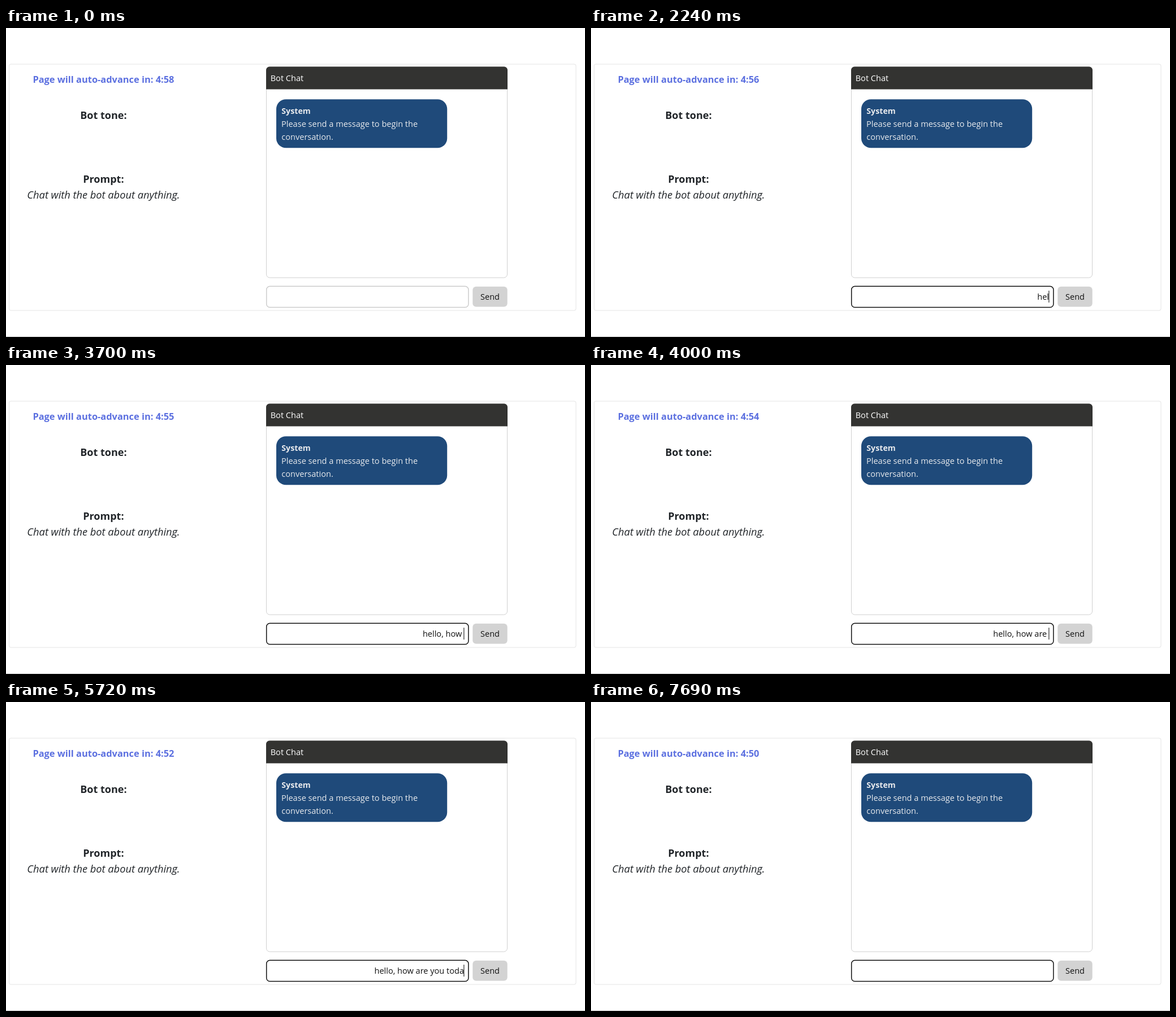
These frames come from a looping animation (1024x547 px, 8000 ms). An HTML page:

```html
<!DOCTYPE html>
<html lang="en">
<head>
<meta charset="utf-8">
<title>Bot Chat</title>
<style>
  html, body { margin: 0; width: 100%; height: 100%; overflow: hidden; background: #fff; }
  svg { display: block; width: 1024px; height: 547px; }
  text { font: 14.55px "Open Sans", "Noto Sans", sans-serif; fill: #111; white-space: pre; }
  .mid { text-anchor: middle; }
  .end { text-anchor: end; }
  .side { font-size: 18px; fill: #212529; }
  .bold { font-weight: 700; }
  #timer { font-size: 16.4px; fill: #5c70e0; }
  .bubble text { fill: #e9ebee; }
</style>
</head>
<body>
<svg viewBox="0 0 1024 547">
  <rect x="5.5" y="64" width="1002.5" height="436" rx="3" fill="#fff" stroke="#e4e4e4"/>
  <path d="M0 546.5H1024" stroke="#c4c4c4"/>

  <text id="timer" class="mid bold" x="172.4" y="97"></text>
  <text class="side mid bold" x="172.4" y="161">Bot tone:</text>
  <text class="side mid bold" x="172.4" y="274">Prompt:</text>
  <text class="side mid" x="172.4" y="302" style="font-size:18.3px;font-style:italic">Chat with the bot about anything.</text>

  <rect x="460.5" y="68.5" width="426" height="373.5" rx="6" fill="#fff" stroke="#d0d0d0"/>
  <path d="M460 108.5V74.5a6 6 0 0 1 6-6H881a6 6 0 0 1 6 6V108.5Z" fill="#333331"/>
  <text x="467.7" y="94" style="fill:#fff">Bot Chat</text>

  <g class="bubble">
    <rect x="478" y="126.3" width="302.2" height="86" rx="17" fill="#1f4a7a"/>
    <text class="bold" x="487.3" y="152" style="font-size:14.2px">System</text>
    <text x="487" y="175">Please send a message to begin the</text>
    <text x="487.3" y="198">conversation.</text>
  </g>

  <rect id="field" x="460.7" y="457.2" width="357.2" height="37.4" rx="6" fill="#fff" stroke-width="1.5"/>
  <text id="typed" class="end" x="810" y="481.3"></text>
  <path id="caret" d="M809.9 465V486" stroke="#000"/>
  <rect x="825.3" y="457.8" width="61.4" height="35.8" rx="6" fill="#d3d3d3"/>
  <text class="mid" x="856" y="481.3">Send</text>

  <g id="mouse">
    <circle r="10.3" fill="#fbf668"/>
    <path id="beam" d="M-1.5 -5.5H0.5M2.5 -5.5H4.5M1.5 -5V5M-1.5 5.5H0.5M2.5 5.5H4.5" stroke="#444" fill="none"/>
    <path id="arrow" d="M0 0V12L3 9.5L5 14L7 13L5 8.8H8.5Z" fill="#fff" stroke="#222" stroke-width=".8"/>
  </g>
</svg>
<script>
const LOOP = 8000, CLICK = 980, SENT = 6530;
const message = "hello, how are you today?";
// moment at which each character of the message appears
const keys = [1870, 2040, 2240, 2370, 2540, 2970, 3120, 3320, 3490, 3540, 3700, 3750, 3830,
  3920, 4000, 4230, 4230, 4260, 4790, 5300, 5380, 5470, 5560, 5820, 5990];
const ticks = [690, 1740, 2740, 3750, 4720, 5720, 6690, 7690];
const caretFlips = [CLICK, 1510, 1870, SENT, 7020, 7560];

const $ = id => document.getElementById(id);
const passed = (list, t) => list.filter(x => x <= t).length;
const show = (id, on) => $(id).setAttribute("visibility", on ? "visible" : "hidden");
const mix = (a, b, k) => a + (b - a) * k;
const progress = (t, from, to) => Math.min(1, Math.max(0, (t - from) / (to - from)));

function moveMouse(t) {
  const visible = t >= 400 && t < 1270;
  const enter = 1 - (1 - progress(t, 400, 780)) ** 2;
  const leave = progress(t, 1080, 1260) ** 1.5;
  const x = mix(mix(996, 781.3, enter), 998, leave);
  const y = mix(mix(499, 470.8, enter), 482, leave);
  const inField = x < 818 && y < 495;
  $("mouse").setAttribute("transform", `translate(${x} ${y})`);
  show("mouse", visible);
  show("beam", visible && inField);
  show("arrow", visible && !inField);
}

function draw(t) {
  $("timer").textContent = "Page will auto-advance in: 4:" + (58 - passed(ticks, t));
  $("typed").textContent = t < SENT ? message.slice(0, passed(keys, t)) : "";
  $("field").setAttribute("stroke", t < CLICK ? "#cccccc" : "#111");
  show("caret", passed(caretFlips, t) % 2);
  moveMouse(t);
}

const start = performance.now();
function frame(now) {
  draw(Math.max(0, now - start) % LOOP);
  requestAnimationFrame(frame);
}
draw(0);
requestAnimationFrame(frame);
</script>
</body>
</html>
```
